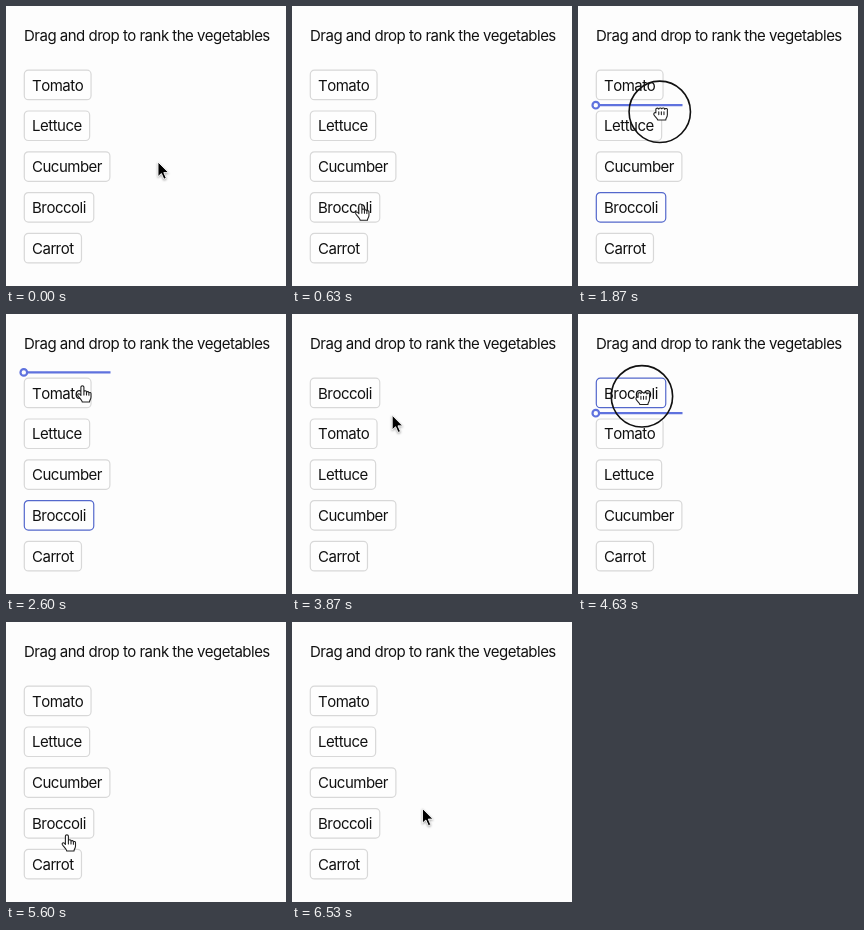
An HTML page for the animation above (6.56 s loop, 280 px wide and 280 px high).

```html
<!DOCTYPE html>
<html lang="en">
<head>
<meta charset="utf-8">
<title>Rank the vegetables</title>
<style>
  html, body { margin: 0; width: 100%; height: 100%; overflow: hidden; background: #fdfdfd; }
  svg { display: block; width: 100vw; height: 100vh; }
  text { font: 400 15px Inter, "Liberation Sans", sans-serif; letter-spacing: -0.5px; fill: #111; }
  .item text { font-kerning: none; }
  .item rect { fill: #fefefe; stroke: #d8d8d8; stroke-width: 1.2; }
  .item.picked rect { stroke: #5468cc; }
  #line { fill: #fdfdfd; stroke: #5f72de; stroke-width: 2.2; }
  #ring { fill: none; stroke: #111; stroke-width: 1.6; }
  .hand { fill: #fff; stroke: #222; stroke-width: 1.1; stroke-linejoin: round; stroke-linecap: round; }
  #arrow { fill: #000; stroke: #fff; stroke-width: .9; filter: drop-shadow(0 1.2px 1.2px rgba(0, 0, 0, .35)); }
</style>
</head>
<body>
<svg viewBox="0 0 280 280">
  <text x="18" y="35">Drag and drop to rank the vegetables</text>
  <g id="list"></g>
  <g id="line">
    <path d="M21 0H104.5"/>
    <circle cx="17.8" r="3.3"/>
  </g>
  <g id="pointer">
    <circle id="ring" r="30.7"/>
    <path id="arrow" d="M0 0V14.6L3.4 11.5L5.9 17.2L8.3 16.2L5.8 10.6H10.5Z"/>
    <path id="point" class="hand" d="M-1.6 9.5V1.3A1.5 1.5 0 0 1 1.4 1.3V6A1.3 1.3 0 0 1 4 6.2A1.3 1.3 0 0 1 6.4 6.9A1.2 1.2 0 0 1 8.5 7.8V11C8.5 13.6 7 14 7 16H-.2C-1 13.4-3.2 12-4.7 9.5C-5.4 8-3.6 7.2-2.7 8.2ZM1.4 6V9M4 6.6V9M6.4 7.2V9.2"/>
    <path id="fist" class="hand" d="M-3.9 1V-1.8A1.5 1.5 0 0 1-1-2.6A1.6 1.5 0 0 1 2-3A1.6 1.5 0 0 1 5-2.4A1.4 1.5 0 0 1 7.6-1.2V3C7.6 5.8 6 6 6 8.2H-2C-2.6 6-5.6 4.6-6 2.6C-6 1-4.6.4-3.9 1ZM-1 0V2.8M1.6 0V2.8M4.2 0V2.8"/>
  </g>
</svg>
<script>
const LOOP = 6560, TOP = 64, PITCH = 40.8;
const $ = id => document.getElementById(id);
const show = (el, on) => el.setAttribute('display', on ? 'inline' : 'none');
const move = (el, x, y) => el.setAttribute('transform', `translate(${x} ${y})`);
const within = (t, a, b) => t >= a && t < b;

const smooth = u => u * u * (3 - 2 * u);
const easeOut = u => 1 - (1 - u) ** 2.5;

// each sweep runs from the last resting place to `to`, arched sideways by `bow`
const home = [152, 156];
const sweeps = [
  { start: 45, end: 735, to: [63, 201] },
  { start: 1482, end: 2420, to: [76.5, 72], bow: [12, 0], ease: easeOut },
  { start: 2900, end: 3335, to: [106, 98] },
  { start: 3740, end: 4300, to: [64, 82], bow: [0, 13] },
  { start: 4610, end: 5320, to: [61, 213], bow: [-8, 0] },
  { start: 5810, end: 6540, to: [130.5, 186.5] }
];

function pointerAt(t) {
  let pos = home;
  for (const { start, end, to, bow = [0, 0], ease = smooth } of sweeps) {
    if (t < start) break;
    const s = ease(Math.min(1, (t - start) / (end - start)));
    const arch = Math.sin(Math.PI * s);
    pos = pos.map((p, k) => p + (to[k] - p) * s + bow[k] * arch);
  }
  return pos;
}

const names = ['Tomato', 'Lettuce', 'Cucumber', 'Broccoli', 'Carrot'];
const ranked = ['Broccoli', ...names.filter(n => n !== 'Broccoli')];

$('list').innerHTML = names.map(n => `<g class="item" id="${n}">
  <rect x="18.3" y=".2" height="29.5" rx="4"/><text x="26" y="20.5">${n}</text></g>`).join('');

for (const n of names) {
  const [box, label] = $(n).children;
  box.setAttribute('width', label.getComputedTextLength() + 15.6);
}

function draw(t) {
  const [x, y] = pointerAt(t);
  const lifted = within(t, 1500, 2630) || within(t, 4630, 5600);
  const pressed = within(t, 1130, 2600) || within(t, 4630, 5600);
  const order = within(t, 2630, 5600) ? ranked : names;

  order.forEach((n, i) => move($(n), 0, TOP + i * PITCH));
  $('Broccoli').classList.toggle('picked', lifted);

  // the drop line sits in the gap above the first item whose middle is below the pointer
  const gap = Math.max(0, Math.ceil((y - TOP - 15.3) / PITCH));
  move($('line'), 0, TOP - 5.6 + gap * PITCH);
  show($('line'), lifted);

  const hover = x < 87, grab = lifted && pressed;
  move($('pointer'), x, y);
  show($('ring'), pressed);
  show($('arrow'), !hover);
  show($('point'), hover && !grab);
  show($('fist'), grab);
}

const start = performance.now();
function tick(now) {
  draw(Math.max(0, now - start) % LOOP);
  requestAnimationFrame(tick);
}
draw(0);
requestAnimationFrame(tick);
</script>
</body>
</html>
```
